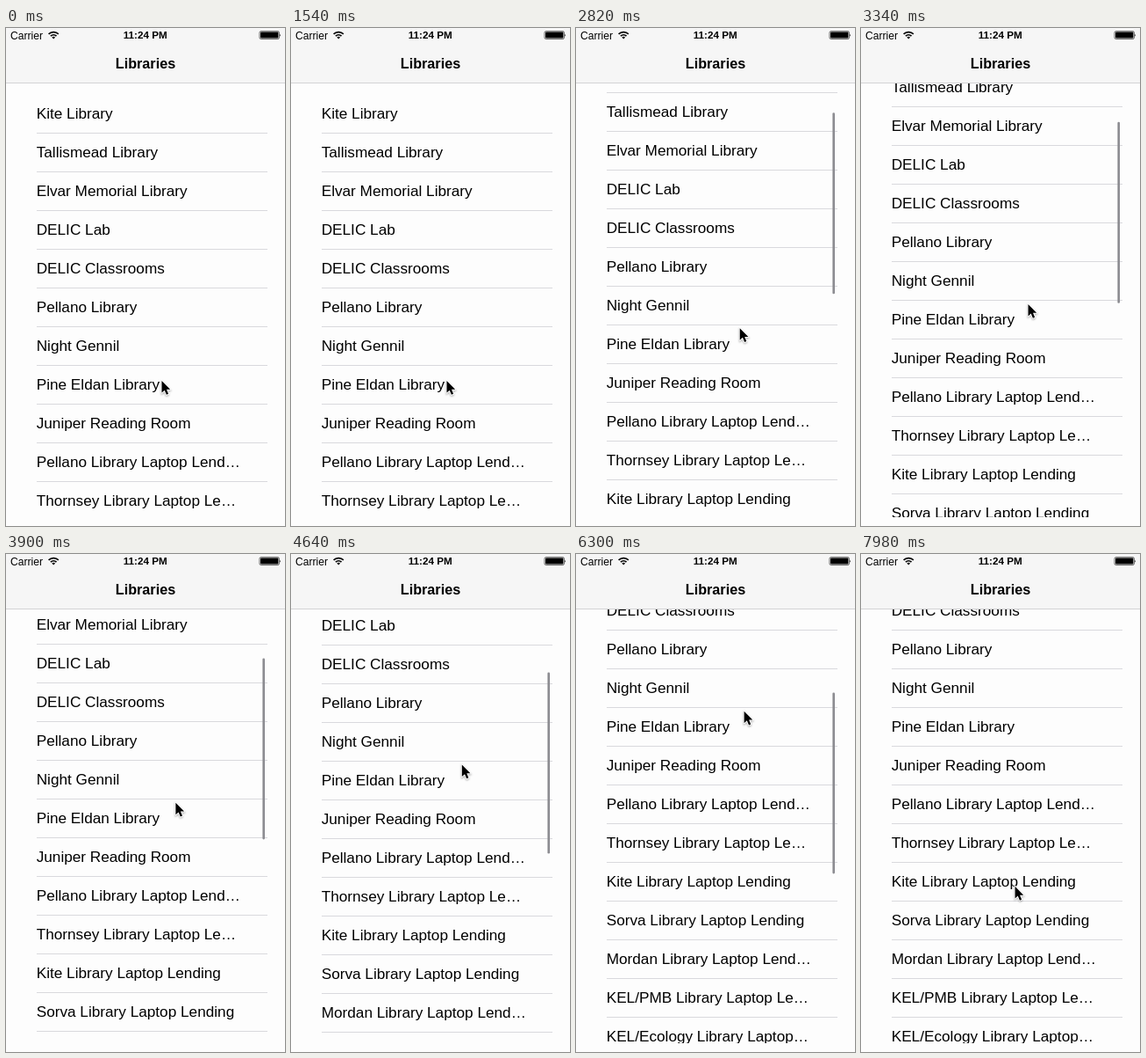
An HTML page for the animation above (8000 ms loop, 318 by 566 pixels).

```html
<!DOCTYPE html>
<html lang="en">
<head>
<meta charset="utf-8">
<title>Libraries</title>
<style>
  html, body { margin: 0; width: 100%; height: 100%; overflow: hidden; background: #fdfdfd; }
  svg { display: block; width: 100%; height: 100%; }
  text { font-family: "Liberation Sans", Arial, sans-serif; fill: #000; }
  .row { font-size: 17.2px; }
  .bold { font-weight: 700; text-anchor: middle; }
</style>
</head>
<body>
<svg viewBox="0 0 318 566" xmlns="http://www.w3.org/2000/svg">
  <defs>
    <clipPath id="view"><rect y="62" width="318" height="494"/></clipPath>
    <filter id="soft" x="-50%" y="-50%" width="200%" height="200%"><feGaussianBlur stdDeviation="1.2"/></filter>
    <path id="arrow" d="M0 0V13.6L3.2 10.7L5.4 15.8L7.6 14.8L5.5 9.8H9.7Z"/>
  </defs>
  <rect width="318" height="566" fill="#fdfdfd"/>
  <g clip-path="url(#view)"><g id="list"></g></g>
  <rect id="bar" x="292.4" width="2.6" height="206" rx="1.3" fill="#8c8c91"/>

  <rect width="318" height="62" fill="#f6f6f6"/>
  <rect y="62" width="318" height="1" fill="#d3d3d5"/>
  <text x="5" y="12.5" font-size="12.1">Carrier</text>
  <g fill="none" stroke="#000" stroke-width="1.7">
    <path d="M48.6 6.9a7.8 7.8 0 0 1 11.2 0"/>
    <path d="M50.9 9.2a4.7 4.7 0 0 1 6.6 0"/>
    <path d="M54.2 12.6l-1.9-2a2.7 2.7 0 0 1 3.8 0z" fill="#000" stroke="none"/>
  </g>
  <text class="bold" x="158.7" y="12.4" font-size="11.7">11:24 PM</text>
  <rect x="289" y="3.7" width="22.4" height="8.8" rx="1.6" fill="none" stroke="#000" stroke-width=".6"/>
  <rect x="290" y="4.6" width="20.4" height="7" rx=".8"/>
  <path d="M312.3 6.7q1.6 1.5 0 3z"/>
  <text class="bold" x="159" y="46" font-size="16.2">Libraries</text>

  <g id="cursor">
    <use href="#arrow" y="1.2" opacity=".35" stroke="#000" stroke-width="1.5" filter="url(#soft)"/>
    <use href="#arrow" stroke="#fff" stroke-width="2" stroke-linejoin="round"/>
    <use href="#arrow"/>
  </g>
</svg>
<script>
const LOOP = 8000, ROW = 44, SCROLL_END = 209;
const DRAG_START = 1750, DRAG_SLOW = 5440, SLOW_AT = 197;
const names = [
  "Kite Library", "Tallismead Library", "Elvar Memorial Library", "DELIC Lab",
  "DELIC Classrooms", "Pellano Library", "Night Gennil", "Pine Eldan Library",
  "Juniper Reading Room", "Pellano Library Laptop Lend…", "Thornsey Library Laptop Le…",
  "Kite Library Laptop Lending", "Sorva Library Laptop Lending",
  "Mordan Library Laptop Lend…", "KEL/PMB Library Laptop Le…", "KEL/Ecology Library Laptop…"
];
const [list, bar, cursor] = ["list", "bar", "cursor"].map(id => document.getElementById(id));

const mix = (a, b, u) => a + (b - a) * u;

// Smooth 0 to 1 between two times
function ease(t, from, to) {
  const u = Math.min(1, Math.max(0, (t - from) / (to - from)));
  return u * u * (3 - 2 * u);
}

// Slowly quickening drag, then an exponential stop
function scrollAt(t) {
  if (t < DRAG_START) return 0;
  if (t < DRAG_SLOW) return SLOW_AT * ((t - DRAG_START) / (DRAG_SLOW - DRAG_START)) ** 1.17;
  return SCROLL_END - (SCROLL_END - SLOW_AT) * Math.exp((DRAG_SLOW - t) / 192);
}

// The pointer drags the list along a shallow arc, then swings back down
function cursorAt(t) {
  const scroll = scrollAt(t), bend = 1 - scroll / SCROLL_END / 0.7;
  const x = 177.5 + 17.3 * (1 - bend * bend);
  const y = 401 - 13.5 * ease(t, 1680, 2700) - scroll;
  const back = ease(t, 7420, LOOP);
  return [mix(x, 175.5, back), mix(y, 378.5, back)];
}

function add(tag, attrs, content = "") {
  const el = document.createElementNS("http://www.w3.org/2000/svg", tag);
  for (const key in attrs) el.setAttribute(key, attrs[key]);
  el.textContent = content;
  list.append(el);
}

names.forEach((name, i) => {
  add("text", { class: "row", x: 34.7, y: 103 + ROW * i }, name);
  add("rect", { x: 35, y: 119 + ROW * i, width: 263, height: 1, fill: "#d9d9dd" });
});

function draw(t) {
  const scroll = Math.round(scrollAt(t));
  list.setAttribute("transform", `translate(0 ${-scroll})`);
  bar.setAttribute("y", 79 + 0.375 * scroll);
  bar.setAttribute("opacity", ease(t, DRAG_START, 1900) - ease(t, 6440, 6850));
  cursor.setAttribute("transform", `translate(${cursorAt(t).join(" ")})`);
}

const start = performance.now();
function tick(now) {
  draw(Math.max(0, now - start) % LOOP);
  requestAnimationFrame(tick);
}
draw(0);
requestAnimationFrame(tick);
</script>
</body>
</html>
```
